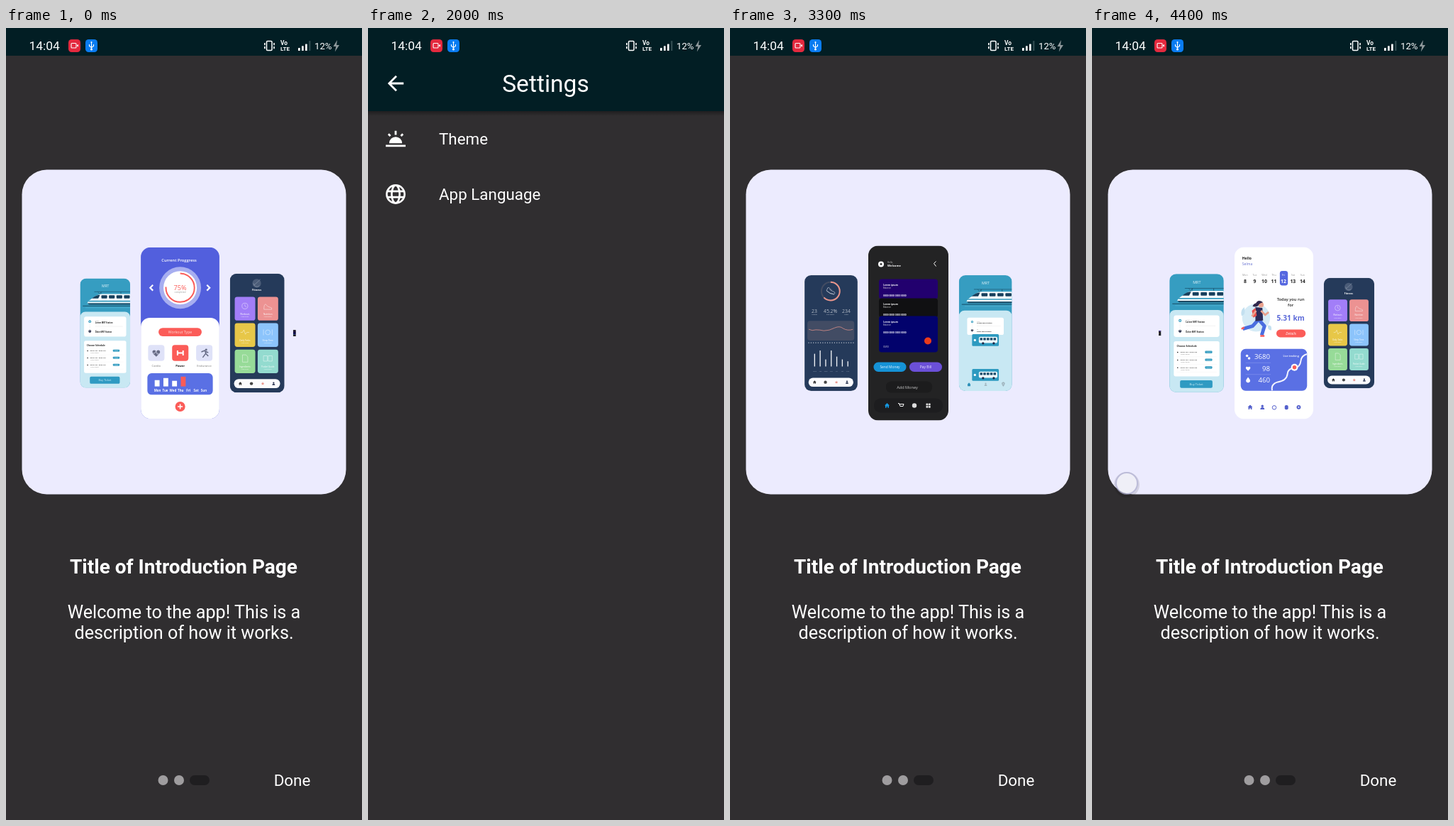
An HTML page for the animation above (4.5 s loop, 502x1115 px).

```html
<!DOCTYPE html>
<html lang="en">
<head>
<meta charset="utf-8">
<title>Introduction screen</title>
<style>
  html, body { margin: 0; width: 100%; height: 100%; overflow: hidden; background: #302e30; }
  svg { display: block; }
  text { font-family: Roboto, sans-serif; }
  .phone text { font-family: "Open Sans", sans-serif; }
</style>
</head>
<body>
<svg id="stage" width="502" height="1115" viewBox="0 0 502 1115"></svg>
<script>
const LOOP = 4500, STEP = 100;
const RED = '#fb5c58', BLUE = '#5a70e4', TEAL = '#369dc1', INK = '#1d2440', SALMON = '#e8958c';
const DAYS = ['Mon', 'Tue', 'Wed', 'Thu', 'Fri', 'Sat', 'Sun'];

// Markup helpers
const rect = (x, y, w, h, r, fill, more = '') =>
  `<rect x="${x}" y="${y}" width="${w}" height="${h}" rx="${r}" fill="${fill}" ${more}/>`;
const disc = (x, y, r, fill, more = '') => `<circle cx="${x}" cy="${y}" r="${r}" fill="${fill}" ${more}/>`;
const line = (d, color, w, more = '') =>
  `<path d="${d}" fill="none" stroke="${color}" stroke-width="${w}" ${more}/>`;
const shape = (d, fill, more = '') => `<path d="${d}" fill="${fill}" ${more}/>`;
const label = (x, y, size, str, fill, more = '') =>
  `<text x="${x}" y="${y}" font-size="${size}" fill="${fill}" ${more}>${str}</text>`;
const mid = (x, y, size, str, fill, more = '') => label(x, y, size, str, fill, 'text-anchor="middle" ' + more);
const group = (id, ...parts) => `<g id="${id}">${parts.join('')}</g>`;
const arc = (x, y, r, share, color, w) =>
  disc(x, y, r, 'none', `stroke="${color}" stroke-width="${w}" pathLength="100" stroke-dasharray="${share} 100" transform="rotate(-90 ${x} ${y})"`);
const times = (n, fn) => Array.from({ length: n }, (_, i) => fn(i)).join('');
const BOLD = 'font-weight="700"', SEMI = 'font-weight="600"', LIGHT = 'font-weight="300"';

const home = (x, y, c) => shape(`M${x - 3.5} ${y}l3.5-3.5 3.5 3.5h-1v3.3h-1.7v-2h-1.6v2h-1.7v-3.3z`, c);
const person = (x, y, c) => disc(x, y - 1.6, 1.7, c) + shape(`M${x - 3} ${y + 3.2}q0-3 3-3t3 3z`, c);
const star = (x, y, c) => shape(`M${x} ${y - 3.4}l1 2.3 2.4.2-1.8 1.6.6 2.4-2.2-1.3-2.2 1.3.6-2.4-1.8-1.6 2.4-.2z`, c);

const statusBar = () =>
  label(32.5, 31, 17.4, '14:04', '#fff') +
  rect(88, 16, 17, 18, 4.5, '#e3293e') + rect(92, 21.5, 7, 6.5, 1, 'none', 'stroke="#fff" stroke-width="1.1"') +
  shape('M99.500 24.700l2.500-2v4z', '#fff') +
  rect(112, 16, 17, 18, 4.5, '#0a7cf2') +
  line('M120.500 20v10M117.500 23v2.500l3 2 3-2v-2.500', '#fff', 1.1) + disc(120.500, 30, 1.5, '#fff') + disc(120.500, 20, 1.1, '#fff') +
  rect(367.500, 18.500, 7.500, 13, 1.2, 'none', 'stroke="#fff" stroke-width="1.5"') +
  line('M364.800 21v3.200M364.800 26v3.200M378 21v3.200M378 26v3.200', '#fff', 1.6) +
  label(387, 24, 8.3, 'Vo', '#fff', BOLD) + label(387, 32, 8, 'LTE', '#fff', BOLD) +
  times(3, i => rect(412 + i * 5, 28 - i * 2.7, 2.7, 4 + i * 2.7, .6, '#fff')) + rect(427, 18, 2.5, 14, .6, '#2d474c') +
  label(435, 29.500, 13.2, '12%', '#fff') + shape('M467 17l-5.500 9h3.800l-1.500 7.500 6.200-9.500h-3.900z', '#8d979a');

const progressScreen = () =>
  rect(0, 0, 113, 246, 0, '#525fdd') + rect(0, 101, 113, 160, 13, '#fff') +
  mid(55, 21, 5.8, 'Current Proggress', '#fff', SEMI) +
  disc(56.600, 58, 30, '#a7aef0') + disc(56.600, 58, 24, '#fff') + arc(56.600, 58, 20.500, 76, RED, 2) +
  mid(56.600, 61, 9.4, '75%', RED) + mid(56.600, 65.500, 3.3, 'completed', '#999') +
  line('M17.500 54l-4 4 4 4M95 54l4 4-4 4', '#fff', 2.2) +
  rect(25.500, 115.500, 62, 12, 6, RED) + mid(56.500, 123.500, 5.3, 'Workout Type', '#ffdcd8') +
  [10.500, 45, 79.500].map((x, i) => rect(x, 140, 23.500, 23, 4, i == 1 ? RED : '#dfe2f8') +
    mid(x + 11.700, 171, 4.2, ['Cardio', 'Power', 'Endurance'][i], i == 1 ? '#111' : '#777', i == 1 ? BOLD : '')).join('') +
  shape('M22.200 157l-5-5q-1.500-4 2-4.500 2 0 3 2 1-2 3-2 3.500.5 2 4.500z', '#666b85') + line('M16 152h4l2-3 1.500 4h5', '#dfe2f8', .8) +
  line('M52 151.500h9.500M52.800 148v7M60.800 148v7', '#fff', 2) +
  disc(94, 147, 1.5, '#666b85') + line('M87 150l5-2 1.500 4-4.500 6M93 152l4 4M92 149l5 2', '#666b85', 1.5) +
  rect(9.500, 180.500, 94, 31, 6, BLUE) +
  [9, 12, 8, 14].map((h, i) => rect(20 + i * 12.500, 199.500 - h, 7, h, 0, i == 3 ? RED : '#fff')).join('') +
  DAYS.map((d, i) => mid(24 + i * 11.100, 207.500, 4.5, d, '#fff', BOLD)).join('') +
  disc(56.600, 228.500, 7.2, RED) + line('M53 228.500h7.200M56.600 225v7', '#fff', 1.6);

const runScreen = () =>
  rect(0, 0, 113, 246, 0, '#fff') +
  label(11, 18, 5.2, 'Hello', '#222', BOLD) + label(11, 25.500, 5.2, 'Selma', '#6570d0') +
  rect(65, 34, 11.500, 21, 3.5, '#5567e0') +
  DAYS.map((d, i) => mid(15.300 + i * 13.700, 41, 3.7, d, i == 4 ? '#fff' : '#999') +
    mid(15.300 + i * 13.700, 51, 7, 8 + i, i == 4 ? '#fff' : '#222', BOLD)).join('') +
  disc(31, 101, 20, '#d5ebf6') + shape('M14 86q-6 5-4 12 7 0 4-12zM48 112q6-1 5 7-6 0-5-7z', '#c3e0f0') +
  line('M34 104l-8 9-14 4M35 104l8 9-4 13', '#4a6ee0', 5, 'stroke-linejoin="round"') +
  shape('M30 86l10 1 1 18-11 1z', '#2c2c58') + shape('M30 87l-5 4 2 10 5-3z', '#e8504c') +
  line('M38 91l6 6 5-4M31 91l-6 8', '#e9a28e', 2.8) + disc(38, 82.500, 3.8, '#e9a28e') +
  shape('M41 79q-7-5-10 1-4 1-5 5 6 1 8-1 1-4 7-5z', '#30284c') + line('M10 117l4-2M37 127h6', RED, 2.6) +
  mid(80.500, 77, 5.8, 'Today you run', '#222', SEMI) + mid(80.500, 85, 5.8, 'for', '#222', SEMI) +
  mid(80.500, 105, 10.3, '5.31 km', '#5a68d8', BOLD) +
  rect(60, 118, 42, 11, 5.5, RED) + mid(81, 125.500, 5, 'Details', '#fff', 'font-style="italic"') +
  rect(9, 145.500, 95, 60, 7, BLUE) +
  ['3680', '98', '460'].map((n, i) => label(51, 160.500 + i * 16.600, 9.8, n, '#fff', 'text-anchor="end"') +
    (i < 2 ? line(`M16 ${165.500 + i * 16.600}h36`, '#8d9cf0', .5) : '') ).join('') +
  disc(18, 155.500, 1.8, '#fff') + disc(21, 159, 1.8, '#fff') +
  shape('M19.500 177l-3-3q-1-3 1.500-3 1 0 1.500 1 .5-1 1.500-1 2.500 0 1.500 3z', '#fff') + shape('M19.500 186q6 7 0 8-6-1 0-8z', '#fff') +
  mid(81, 157, 3.7, 'Live tracking', '#fff', SEMI) +
  line('M54 205q-2-9 8-12 13-2 14-12 1-8 10-8 8-1 9-10 1-8 9-10', '#f3f4ff', 2) +
  disc(86, 172, 5, '#fff') + disc(86, 172, 2.8, RED) +
  home(22.500, 229, '#5460cc') + person(40, 229, '#5460cc') + disc(57, 229.500, 2.8, 'none', 'stroke="#5460cc" stroke-width="1"') +
  rect(72, 226, 5, 6.500, 2, '#5460cc') + disc(92, 229, 3, '#5460cc') + disc(92, 229, 1, '#fff');

const TILES = [['#a27ef8', 'Workouts'], ['#ec9292', 'Nutrition'], ['#e7c748', 'Daily Tasks'],
  ['#8cc4fb', 'Sleep Time'], ['#97db98', 'Ingredients'], ['#93dbcf', 'Pocket Guide']];
const GLYPHS = ['M-6 0a6 6 0 1 0 12 0a6 6 0 1 0-12 0M0-4v4l3 2', 'M-8 4q0-6 3-8l5 5 8 3v3H-8z', 'M-9 0h4l3-5 3 9 3-4h5',
  'M-9-6v12M9-6v12M-5 0a5 5 0 1 0 10 0a5 5 0 1 0-10 0', 'M-5-8h7l4 4v11h-11z', 'M-9-6h8v11h-8zM1-6h8v11h-8z'];
const tileRow = row => group('row' + row, ...[0, 1].map(col => {
  const [fill, name] = TILES[row * 2 + col], x = col ? 57.500 : 10, y = 48 + row * 54.500;
  return rect(x, y, 42.500, 49, 5, fill) +
    line(GLYPHS[row * 2 + col], '#fff', .8, `opacity=".8" transform="translate(${x + 21} ${y + 19})"`) +
    mid(x + 21, y + 37, 4.4, name, '#fff') + mid(x + 21, y + 42, 2.6, 'Lorem ipsum', '#fff');
}));

const navyScreen = () =>
  rect(0, 0, 113, 246, 0, '#253a5a') +
  group('logo', disc(55.500, 20, 9, '#4b5c78'), line('M50 24l13-12M49 20a7 7 0 0 0 12 5', '#9aa6b8', .8), mid(55.500, 36, 5.4, 'Fitness', '#fff', BOLD)) +
  group('ring', disc(55.500, 34, 19.500, 'none', 'stroke="#434c62" stroke-width="3"'), arc(55.500, 34, 19.500, 63, SALMON, 3),
    line('M47 31q2 0 2-4l3-1 4 6 8 4q2 3-1 4-8 0-16-7zM47 33q6 7 16 8M54 31l2-2M56 33l2-2', '#e6e9ef', .8)) +
  group('stats', ...[['23', 'LOREM'], ['45.2%', 'DOLORSIT'], ['234', 'AMET']].map(([n, s], i) =>
    mid(21 + i * 34, 79.500, 10.4, n, '#fff', LIGHT) + mid(21 + i * 34, 84.700, 3.4, s, '#e3e7ee'))) +
  group('graph', rect(6, 97, 100, 42, 6, '#424c64'),
    line('M9 115q8 4 15 1 9 0 17 2 12 0 23-6 11-5 18 1 10 6 21 2', SALMON, 1.1)) +
  group('bars', times(20, i => disc(9 + i * 5, 143.500, 1, '#e8ebf0')),
    ...[27, 34, 15, 34, 21, 15, 11].map((h, i) => rect(20.500 + i * 11.800, 194 - h, 2, h, 0, '#f2f4f8') +
      mid(22 + i * 11.700, 206, 3.5, DAYS[i], '#9aa5b8'))) +
  [0, 1, 2].map(tileRow).join('') +
  rect(8.500, 218, 95.500, 19, 9.500, '#fbfbfd') +
  home(21.500, 227.500, '#333') + disc(44.500, 227.500, 3.3, '#444') + star(68, 227.500, SALMON) + person(90.500, 227.500, '#222c4a');

const darkNav = () => rect(8, 215, 97, 20, 9, '#1d1d1f') + home(26.500, 225, '#1597e0') +
  line('M42 222h1.500l1.500 4h4l1-3h-6', '#fff', 1) + disc(65, 225, 3.2, '#ddd') + times(4, i => rect(81.500 + i % 2 * 3.400, 222 + (i >> 1) * 3.400, 2.8, 2.8, .4, '#ddd'));
const bankCard = (y, h, fill) => rect(15, y, 83, h, 4, fill) +
  label(21, y + 9, 3.2, 'Lorem ipsum', '#fff', BOLD) + label(21, y + 13, 3, 'Balance', '#ddd') +
  label(21, y + 24, 3.3, '0000 0000 0000 0000', '#e8e8f4', BOLD);

const cardsScreen = () =>
  rect(0, 0, 113, 246, 0, '#232324') +
  disc(18, 26, 4, '#fff') + disc(18, 26, 1.4, '#333') + label(27, 24, 3, 'Hello,', '#ccc') + label(27, 29.500, 4.2, 'Welcome', '#fff', BOLD) +
  line('M95.500 22l-3 3 3 4', '#fff', 1) +
  bankCard(47, 28, '#22006e') + bankCard(74, 27, '#101012') + bankCard(99, 51, '#02026c') + label(21, 143, 3, '00/00', '#ddd') +
  disc(84, 134, 5, '#eb3a1b') +
  rect(7.500, 164, 46, 13.500, 6.7, '#1592d6') + mid(30.500, 172.500, 4.9, 'Send Money', '#e8f4ff') +
  rect(58, 164, 46, 13.500, 6.7, '#6b50d8') + mid(81, 172.500, 4.9, 'Pay Bill', '#efeaff') +
  rect(25, 191, 65, 16, 7, '#1c1c1d') + mid(55, 201, 5.6, 'Add Money', '#c8c8c8') + darkNav();

const listScreen = () =>
  rect(0, 0, 113, 246, 0, '#232324') + rect(15, 19, 83, 33, 5, '#6c50d8') +
  [0, 1].map(i => label(37, 30 + i * 12, 3.5, 'Lorem ipsum', '#ddd8ff') + label(70, 30 + i * 12, 3.5, '$ 2,450', '#fff', BOLD)).join('') +
  line('M23 29v14M28 32v8', '#9a84f0', 1.5) +
  rect(8, 69, 93, 13, 6.500, '#1a1a1b') + disc(14, 75, 2.2, 'none', 'stroke="#fff"') + line('M15.500 76.500l2 2', '#fff', 1) + label(22, 77, 3.8, 'Search', '#888') +
  rect(15, 99, 84, 108, 5, '#1b1b1c') +
  times(6, i => { const y = 110 + i * 13.600;
    return rect(23, y - 4.500, 9, 9, 1, '#f1e4e4') + rect(24, y - 1, 7, 3, 1, '#d8504c') +
      label(36, y - .5, 3.8, 'Lorem ipsum', '#eee', SEMI) + label(36, y + 3.500, 2.8, 'dolor sit amet', '#888') +
      label(66, y + 1, 2.8, '12:30', '#777') + disc(86, y, 3, i % 3 == 1 ? '#444' : '#1c8fd8'); }) +
  mid(40, 196, 4, 'Add', '#ddd') + rect(58, 189, 35, 11, 5.5, '#1592d6') + mid(75.500, 196, 4, 'Send', '#d8efff') + darkNav();

const trainArt = () => shape('M16 56q2-6 13-12 10-9 22-9h62v21z', '#f6fafc') + shape('M27 45q9-8 18-8l-4 8z', '#173f5c') +
  times(4, i => rect(48 + i * 17, 38, 13, 7, 1.5, '#173f5c')) + shape('M20 50h93v2.500H18z', TEAL) + shape('M17 56h96v3H20z', '#1f4c66');
const miniCard = (id, y) => group(id, rect(9, y - 21, 95, 42, 4, '#2d9ac0'), rect(33, y - 12, 66, 22, 5, '#eef8fb'),
  times(5, i => rect(37 + i * 12, y - 8, 9, 8, 1, '#1b4a68')), disc(48, y + 11, 4, INK), disc(86, y + 11, 4, INK), disc(19, y, 4, '#fff'));

const trainScreen = () =>
  rect(0, 0, 113, 246, 0, TEAL) + mid(57, 20, 8, 'MRT', '#e4f6fb') +
  line('M32 30h81M47 30v5M92 30v5', '#174c66', 1) + line('M40 30l4 5 5-5', '#174c66', .8) + trainArt() +
  line('M6 62h107', '#174c66', 1.5) + line('M12 66h101', '#59b4d2', 1) +
  rect(0, 75, 113, 190, 12, '#c8e8f3') +
  group('stops', rect(9, 86, 95, 45, 5, '#fff'), disc(22, 97, 3, TEAL), disc(22, 97, 1.2, '#fff'), line('M22 102v12', '#ccc', .6, 'stroke-dasharray="1 1"'),
    disc(22, 119, 3, INK), disc(22, 118, 1.1, '#fff'), label(34, 97, 3.4, 'From', '#888'), label(34, 102, 4.2, 'Lorem MRT Station', '#222', BOLD),
    line('M34 108h62', '#ddd', .6), label(34, 118, 3.4, 'To', '#888'), label(34, 123, 4.2, 'Dolor MRT Station', '#222', BOLD)) +
  miniCard('bus', 138) + miniCard('tram', 212) +
  group('times', rect(9, 140, 95, 73, 4, '#fff'), label(15, 152, 5, 'Choose Schedule', '#222', BOLD),
    times(3, i => { const y = 164 + i * 16;
      return disc(17, y - 1, 1.2, '#222') + label(23, y, 3.6, '08:00 AM - 09:30 AM', '#222', SEMI) +
        label(23, y + 4.500, 3, 'Lorem station', '#777') + rect(74, y - 4, 15, 5, 1.5, TEAL) + mid(81.500, y, 3.4, 'Select', '#fff') + line(`M15 ${y + 8}h83`, '#eee', .5); })) +
  group('tabs', home(21.500, 232, '#2f91b8') + rect(18.500, 232, 6, 4, .5, '#2f91b8'), person(57, 232, '#9fb4bd'),
    shape('M94.500 237q-7-9 0-10 7 1 0 10z', '#9fb4bd'), disc(94.500, 231, 1.2, '#c8e8f3')) +
  group('buy', rect(22, 221, 67.500, 16, 3, '#2f9ac2'), mid(56, 231.500, 6, 'Buy Ticket', '#d5f0f8'));

const phone = (i, body) => `<g class="phone" id="phone${i}" clip-path="url(#frame)">${body}</g>`;

const intro = () =>
  rect(0, 0, 502, 39, 0, '#021e24') + rect(22.500, 199.500, 457, 457, 35, '#ecebfe') +
  phone(0, trainScreen()) + phone(1, group('progress', progressScreen()) + group('run', runScreen())) +
  phone(2, navyScreen()) + phone(3, group('cards', cardsScreen()) + group('list', listScreen())) +
  mid(250.500, 768, 28, 'Title of Introduction Page', '#fff', BOLD) +
  mid(251, 831, 25.2, 'Welcome to the app! This is a', '#fff') + mid(251, 860, 25.2, 'description of how it works.', '#fff') +
  disc(221.500, 1059, 7, '#9f9d9f') + disc(244, 1059, 7, '#9f9d9f') + rect(259, 1052, 28, 14, 7, '#1f1e20') +
  `<g clip-path="url(#button)">` + rect(328, 1034, 152, 50, 8, '#2c5f86', 'id="press"') + disc(428, 1076, 1, '#2770ac', 'id="ripple"') + '</g>' +
  mid(403.500, 1067, 22.4, 'Done', '#fff');

const icon = (y, body) => `<g transform="translate(22.200 ${y - 16.8}) scale(1.4)">${body}</g>`;
const settings = () =>
  rect(0, 0, 502, 1115, 0, '#302e30') + rect(0, 117, 502, 7, 0, 'url(#shade)') + rect(0, 0, 502, 117, 0, '#021e24') +
  disc(39, 78, 30, '#fff', 'id="tap"') +
  group('bar', icon(78, shape('M20 11H7.830l5.590-5.590L12 4l-8 8 8 8 1.410-1.410L7.830 13H20z', '#fff')), mid(250.500, 89.500, 33.6, 'Settings', '#fff')) +
  icon(156, shape('M2 18h20v2H2zM5.500 16.500a6.500 6.500 0 0 1 13 0zM11 4h2v4h-2z', '#fff') + line('M4.700 7.200l2 2M19.300 7.200l-2 2', '#fff', 2)) +
  icon(234, line('M3 12a9 9 0 1 0 18 0a9 9 0 1 0-18 0M8 12a4 9 0 1 0 8 0a4 9 0 1 0-8 0M3.800 9h16.400M3.800 15h16.400', '#fff', 1.9)) +
  label(100, 164, 22.4, 'Theme', '#fff') + label(100, 242, 22.4, 'App Language', '#fff');

document.getElementById('stage').innerHTML =
  `<defs><clipPath id="frame"><rect width="113" height="246" rx="14"/></clipPath>
  <clipPath id="button"><rect x="328" y="1034" width="152" height="50" rx="8"/></clipPath>
  <linearGradient id="shade" x2="0" y2="1"><stop stop-opacity=".35"/><stop offset="1" stop-opacity="0"/></linearGradient></defs>` +
  group('intro', intro()) + group('settings', settings()) + statusBar() +
  group('touch', disc(0, 2, 18, '#000', 'opacity=".12"'), disc(0, 0, 15, '#f2f2f8', 'fill-opacity=".88" stroke="#a6a6cc" stroke-opacity=".7" stroke-width="2"'));

// Motion: [time, value] keys, eased between; equal times make a hard change
const TRACKS = {
  pos: [[0, 1.055], [400, 2], [3000, 2], [3300, 3], [3400, 3], [3600, 4], [4000, 4], [4400, 4.954]],
  row0: [[300, 1], [600, .2], [800, 0], [3600, 0], [3600, 1]],
  row1: [[400, 1], [600, .7], [1100, .22], [1200, .1], [2800, 0], [3600, 0], [3600, 1]],
  row2: [[1000, 1], [1100, .9], [1200, .8], [2800, 0], [3600, 0], [3600, 1]],
  logo: [[300, 1], [500, 0], [3600, 0], [3600, 1]],
  ring: [[500, 0], [600, .2], [1000, 1], [3600, 1], [3600, 0]],
  stats: [[500, 0], [600, .2], [1000, 1], [3600, 1], [3600, 0]],
  graph: [[1000, 0], [1100, .37], [1200, .6], [2800, 1], [3600, 1], [3600, 0]],
  bars: [[1200, 0], [2800, 1], [3600, 1], [3600, 0]],
  stops: [[500, 1], [500, .82], [3700, .82], [3900, 1]],
  minis: [[500, 0], [500, .6], [3500, .6], [3700, .28], [3800, 0]],
  times: [[500, 1], [500, 0], [3600, 0], [3700, .49], [3900, 1]],
  buy: [[500, 1], [500, 0], [3700, 0], [3900, 1]],
  press: [[500, 0], [600, .12], [1100, .26]],
  ripple: [[500, 10], [600, 28], [1100, 37]],
  tap: [[2500, 0], [2600, .12], [2800, .12]],
  touchX: [[1000, 431], [1000, 39], [3000, 39], [3000, 71], [3700, 71], [4400, 49]],
  touchY: [[1000, 1075], [1000, 78], [3000, 78], [3000, 654], [3700, 654], [4400, 641]],
  touch: [[400, 0], [600, .95], [800, .9], [1000, 0], [2400, 0], [2600, .9], [2800, 0], [3600, 0], [3700, .24], [4000, .85], [4400, .9]]
};
const SLOT_X = [93.500, 142.500, 251.500, 360.200, 409.500], SLOT_SCALE = [0, .662, 1, .662, 0];

const mix = (a, b, k) => a + (b - a) * k;
const along = (list, p) => { const i = Math.min(Math.floor(p), list.length - 2); return mix(list[i], list[i + 1], p - i); };
function at(name, t) {
  const keys = TRACKS[name], i = keys.findIndex(k => k[0] > t);
  if (i == 0) return keys[0][1];
  if (i < 0) return keys[keys.length - 1][1];
  const [t0, a] = keys[i - 1], [t1, b] = keys[i], k = (t - t0) / (t1 - t0);
  return mix(a, b, k * k * (3 - 2 * k));
}

const nodes = {};
const $ = id => nodes[id] ||= document.getElementById(id);
const put = (id, value) => $(id).setAttribute('transform', value);
const fade = (id, value) => $(id).setAttribute('opacity', value);
const show = (id, on) => $(id).setAttribute('display', on ? 'inline' : 'none');
const zoom = (id, x, y, s, dy = 0) => { show(id, s > .01); put(id, `translate(${x} ${y + dy}) scale(${s}) translate(${-x} ${-y})`); };

function draw(t) {
  const away = t >= 1200 && t < 2800, pos = at('pos', t);
  show('intro', !away);
  show('settings', away);
  for (let i = 0; i < 4; i++) {
    const slot = ((i - pos + 2) % 4 + 4) % 4, s = along(SLOT_SCALE, slot);
    show('phone' + i, s > .01);
    put('phone' + i, `translate(${along(SLOT_X, slot)} 429.500) scale(${s}) translate(-56.500 -123)`);
  }
  show('progress', t < 3300);
  show('run', t >= 3300);
  show('cards', t < 3400);
  show('list', t >= 3400);

  // Each tile shrinks about its own centre and sinks a little
  for (let r = 0; r < 3; r++) {
    const s = at('row' + r, t), y = 72.500 + r * 54.500;
    show('row' + r, s > .01);
    [...$('row' + r).children].forEach((el, i) => {
      const x = i < $('row' + r).children.length / 2 ? 31.250 : 78.750;
      const own = el.getAttribute('data-own') ?? (el.getAttribute('transform') || '');
      el.setAttribute('data-own', own);
      el.setAttribute('transform', `translate(${x} ${y + (1 - s) * 24}) scale(${s}) translate(${-x} ${-y}) ${own}`);
    });
  }
  fade('logo', at('logo', t));
  zoom('ring', 55.500, 34, at('ring', t));
  const stats = at('stats', t);
  fade('stats', stats);
  put('stats', `translate(0 ${(1 - stats) * 12})`);
  zoom('graph', 56, 118, at('graph', t));
  fade('bars', at('bars', t));

  const buy = at('buy', t);
  zoom('stops', 56.500, 108.500, at('stops', t));
  zoom('bus', 56.500, 138, at('minis', t));
  zoom('tram', 56.500, 212, at('minis', t));
  zoom('times', 56.500, 176, at('times', t));
  fade('buy', buy);
  fade('tabs', 1 - buy);

  const pressed = t >= 500 && t < 1200;
  show('press', pressed);
  show('ripple', pressed);
  fade('press', at('press', t));
  fade('ripple', at('press', t) * 1.1);
  $('ripple').setAttribute('r', at('ripple', t));
  fade('bar', t < 1300 ? .9 : 1);
  fade('tap', at('tap', t));
  put('touch', `translate(${at('touchX', t)} ${at('touchY', t)})`);
  fade('touch', at('touch', t));
}

const start = performance.now();
function tick() {
  const t = (performance.now() - start) % LOOP;
  draw(Math.floor(t / STEP) * STEP);
  requestAnimationFrame(tick);
}
tick();
</script>
</body>
</html>
```
